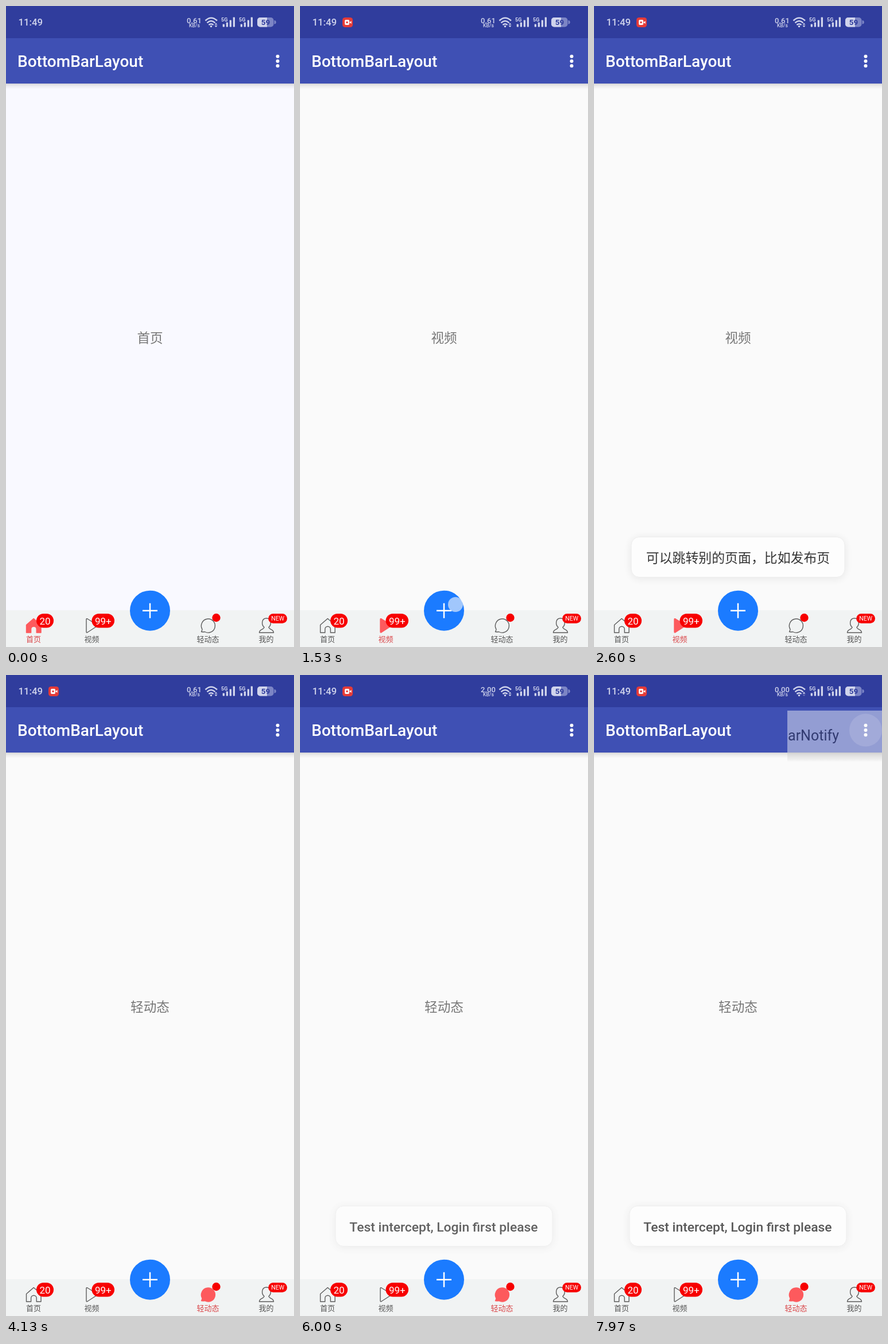
An HTML page for the animation above (8000 ms loop, 502 by 1116 pixels).

```html
<!DOCTYPE html>
<html lang="zh">
<head>
<meta charset="utf-8">
<title>BottomBarLayout</title>
<style>
html, body { margin: 0; width: 100%; height: 100%; overflow: hidden; background: #fafafa; }
svg { display: block; width: 502px; height: 1116px; }
text { font-family: Roboto, "Noto Sans CJK SC", "Noto Sans CJK", sans-serif; }
.mid { text-anchor: middle; }
.status { fill: #d0d4ec; }
.label { font-size: 13px; fill: #555; }
.icon { fill: none; stroke: #5c5c5c; stroke-width: 1.4; stroke-linejoin: round; }
.on .label { fill: #d9474a; }
.on .icon { fill: #fd5a5d; stroke: #fd5a5d; }
.badge { fill: #f70000; }
.badge + text { fill: #fff; }
.toast rect { fill: #fefefe; stroke: #ebebeb; filter: drop-shadow(0 2px 8px #00000016); }
.toast text { font-weight: 500; fill: #222; }
</style>
</head>
<body>
<svg viewBox="0 0 502 1116">
  <defs>
    <linearGradient id="shade" x2="0" y2="1">
      <stop stop-color="#000" stop-opacity=".15"/>
      <stop offset=".4" stop-color="#000" stop-opacity=".06"/>
      <stop offset="1" stop-color="#000" stop-opacity="0"/>
    </linearGradient>
    <linearGradient id="menuFade" x2="0" y2="1">
      <stop stop-color="#c8c8c8"/>
      <stop offset=".7" stop-color="#dcdcdc"/>
      <stop offset="1" stop-color="#fafafa"/>
    </linearGradient>
    <clipPath id="reveal"><rect id="window"/></clipPath>
  </defs>

  <rect width="502" height="1116" fill="#fafafa"/>
  <rect id="tint" width="502" height="1116" fill="#f9f9ff"/>
  <rect y="135" width="502" height="10" fill="url(#shade)"/>
  <rect width="502" height="57" fill="#303d9d"/>
  <rect y="56" width="502" height="79" fill="#3f50b4"/>

  <g class="status">
    <text x="21.500" y="34" font-size="16.800" font-weight="500">11:49</text>
    <g id="recorder">
      <rect x="74" y="20" width="18" height="17" rx="4.500" fill="#e53b38"/>
      <rect x="78" y="24" width="8" height="9" rx="2" fill="#fff"/>
      <path d="M86 28.500l3.500-2.500v5z" fill="#fff"/>
      <circle cx="82" cy="28.500" r="1.700" fill="#e53b38"/>
    </g>
    <text id="speed" class="mid" x="328" y="30" font-size="13" font-weight="500"></text>
    <text class="mid" x="328.500" y="37" font-size="8.700" font-weight="500">KB/s</text>
    <g fill="none" stroke="#d0d4ec" stroke-width="2.500">
      <path d="M347.500 25.500q10-9.500 20.500 0M350.500 29.300q7-6.500 14 0"/>
      <path d="M353.500 33q4-3.500 8 0"/>
    </g>
    <circle cx="357.500" cy="35.500" r="1.700"/>
    <path d="M363.500 32.500l2.500-3 2.500 3z"/>
    <path id="down" d="M363.500 34l2.500 3 2.500-3z"/>
    <g id="signals"></g>
    <rect x="438" y="20" width="28.500" height="16.500" rx="5" fill="#7c85c5"/>
    <path d="M443 20h12v16.500h-12a5 5 0 0 1-5-5v-6.500a5 5 0 0 1 5-5z"/>
    <path d="M467.500 25a2 2 0 0 1 0 6.500z" fill="#7c85c5"/>
    <text class="mid" x="452.500" y="33" font-size="13.500" font-weight="700" fill="#303d9d">59</text>
  </g>

  <text x="20" y="106" font-size="28" font-weight="500" fill="#fff">BottomBarLayout</text>
  <circle id="ripple" cx="473.500" cy="96" fill="#fff"/>
  <g fill="#fff">
    <circle cx="473.500" cy="87.700" r="3"/>
    <circle cx="473.500" cy="96" r="3"/>
    <circle cx="473.500" cy="104.300" r="3"/>
  </g>
  <g id="menu">
    <g clip-path="url(#reveal)">
      <rect x="200" y="62" width="302" height="73" fill="#fafafa"/>
      <rect x="200" y="135" width="302" height="16" fill="url(#menuFade)"/>
      <text x="427" y="114" text-anchor="end" font-size="25" fill="#212121">BarNotify</text>
    </g>
  </g>

  <text id="page" class="mid" x="251" y="585.500" font-size="22.600" fill="#777"></text>

  <g class="toast" id="publish">
    <rect x="65" y="924.500" width="372" height="70" rx="14"/>
    <text class="mid" x="251" y="968.500" font-size="22.900">可以跳转别的页面，比如发布页</text>
  </g>
  <g class="toast" id="login">
    <rect x="62" y="924.500" width="378" height="70" rx="14"/>
    <text class="mid" x="250.500" y="968.500" font-size="22.850">Test intercept, Login first please</text>
  </g>

  <rect y="1052" width="502" height="64" fill="#f1f3f3"/>
  <g id="tabs"></g>
  <rect class="badge" x="53" y="1058" width="30" height="24.500" rx="12.200"/>
  <text class="mid" x="68" y="1076.500" font-size="17">20</text>
  <rect class="badge" x="149.500" y="1058" width="39.500" height="24.500" rx="12.200"/>
  <text class="mid" x="169.300" y="1076.500" font-size="17">99+</text>
  <circle class="badge" cx="366.500" cy="1065" r="7.200"/>
  <rect class="badge" x="457.300" y="1058" width="32.700" height="16.700" rx="8.300"/>
  <text class="mid" x="473.600" y="1070.200" font-size="10.500">NEW</text>

  <circle cx="251" cy="1052.700" r="35" fill="#1b7bff"/>
  <path d="M238 1052.700h26M251 1039.700v26" stroke="#fff" stroke-width="2.500"/>
  <circle id="finger" r="13" fill="#eef2fa" fill-opacity=".64"/>
</svg>
<script>
const $ = id => document.getElementById(id);
const LOOP = 8000;

const tabs = [
  [48, '首页', 'M35.500 1091V1077.500L48.200 1066.500 61 1077.500V1091H53.200V1085a4.800 4.800 0 0 0-9.600 0V1091Z'],
  [149.5, '视频', 'M140 1068q0-2 2-1l17 10.500q1.500 1 0 2l-17 11q-2 1-2-1z'],
  [352, '轻动态', 'M340.500 1089.500c3 .5 5 .3 6 0a12 12 0 1 0-4.500-4.500q-.3 3-1.500 4.500z'],
  [453.5, '我的', 'M441.500 1091c0-6 8-5 8.500-9.500c-5-4-5-15.500 4-15.500s9 11.500 4 15.500c.5 4.500 8.500 3.500 8.500 9.500z']
];
$('tabs').innerHTML = tabs.map(([x, name, d]) =>
  `<g><path class="icon" d="${d}"/><text class="label mid" x="${x}" y="1107">${name}</text></g>`).join('');

$('signals').innerHTML = [0, 31].map(dx => `<g transform="translate(${dx})">
  <text x="375" y="26.500" font-size="9" font-weight="700">5G</text>` +
  [5, 8, 12, 17].map((h, i) =>
    `<rect x="${377.7 + i * 6}" y="${36.5 - h}" width="3.300" height="${h}" rx=".8"/>`).join('') + '</g>').join('');

// start, end, x, y of each tap
const taps = [
  [980, 1090, 150, 1081],
  [1470, 1600, 271, 1042],
  [3720, 3830, 352, 1081],
  [5720, 5830, 456, 1081],
  [7680, 7790, 474, 97]
];

const ramp = (t, from, to) => Math.min(1, Math.max(0, (t - from) / (to - from)));
const fade = (id, value) => $(id).setAttribute('opacity', value);
const set = (id, attrs) => {
  for (const key in attrs) $(id).setAttribute(key, attrs[key]);
};

function draw(now) {
  const t = now % LOOP;
  const current = t < 1090 ? 0 : t < 3830 ? 1 : 2;
  [...$('tabs').children].forEach((tab, i) => tab.classList.toggle('on', i === current));
  $('page').textContent = tabs[current][1];
  $('speed').textContent = t < 4500 ? '0.61' : t < 7500 ? '2.00' : '0.00';

  fade('tint', 1 - ramp(t, 30, 400));
  fade('recorder', ramp(t, 100, 300));
  fade('down', t < 6700 ? 1 : 0.35);
  fade('publish', 0.91 * ramp(t, 1640, 1840) * (1 - ramp(t, 3640, 3940)));
  fade('login', ramp(t, 5860, 6060) * (1 - ramp(t, 7880, 8240)));

  const tap = taps.find(([from, to]) => t >= from && t < to);
  fade('finger', tap ? 1 : 0);
  if (tap) set('finger', { cx: tap[2], cy: tap[3] });

  const press = ramp(t, 7690, 7890);
  set('ripple', { r: 28.5 * press, opacity: 0.14 * press });

  const open = ramp(t, 7900, 7970);
  const width = 165 * open;
  fade('menu', 0.45 * open);
  set('window', { x: 502 - width, y: 62, width, height: 89 * open });

  requestAnimationFrame(() => draw(performance.now()));
}
draw(performance.now());
</script>
</body>
</html>
```
